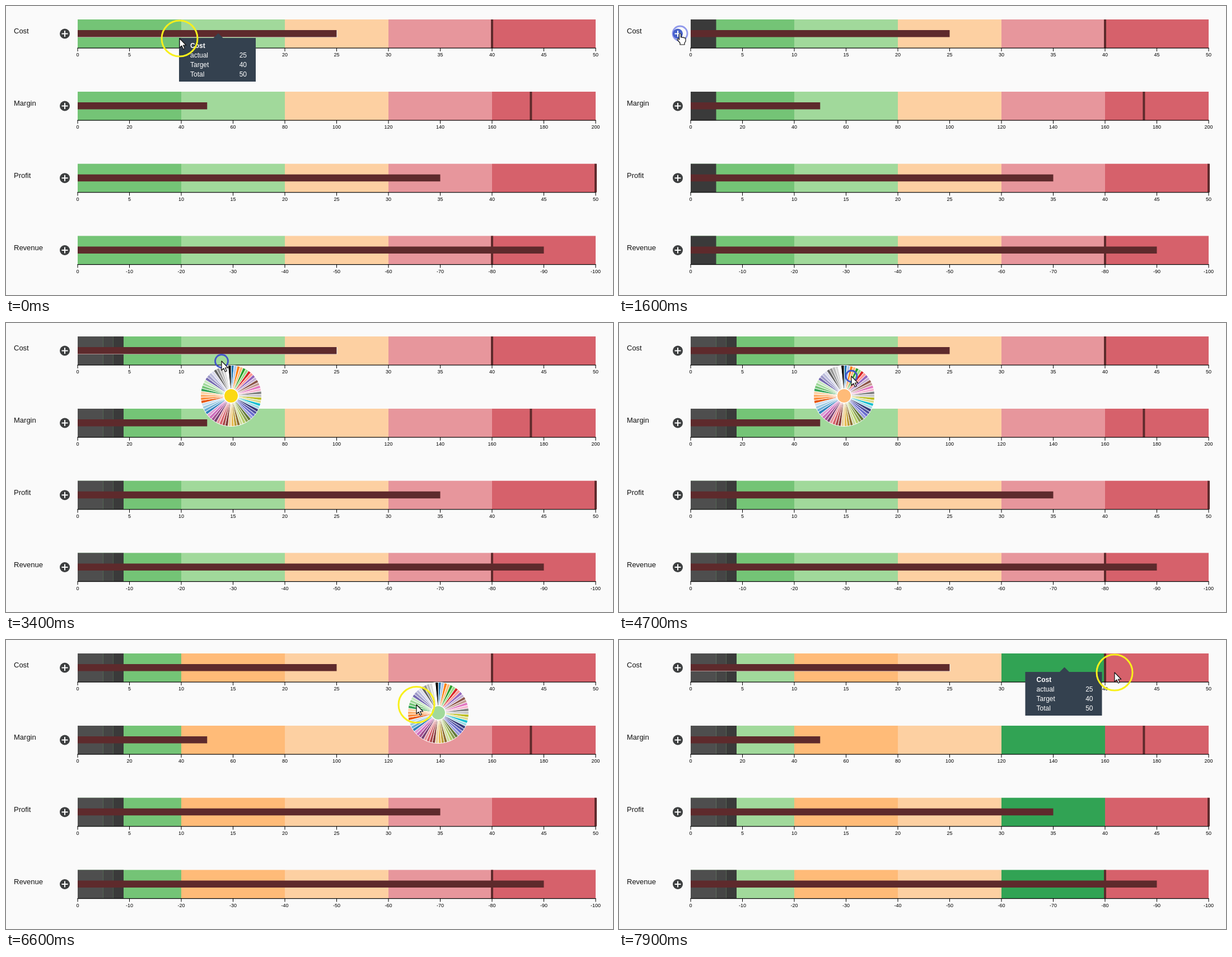
Animation of 1084x516 px, one loop 8000 ms. Source, as an HTML page with a canvas:

```html
<!DOCTYPE html>
<html lang="en">
<head>
<meta charset="utf-8">
<title>Bullet charts</title>
<style>
  html, body { margin: 0; width: 100%; height: 100%; overflow: hidden; background: #fafafa; }
  canvas { display: block; }
</style>
</head>
<body>
<canvas width="1084" height="516"></canvas>
<script>
const ctx = document.querySelector('canvas').getContext('2d');
const LOOP = 8000, LEFT = 128, WIDTH = 925, BAND = WIDTH / 5, TAU = Math.PI * 2;
const FONT = '"Liberation Sans", Arial, sans-serif';
const DARK_RED = '#5e2a2c';

const charts = [
  { name: 'Cost', y: 24, max: 50, step: 5, actual: 25, target: 40 },
  { name: 'Margin', y: 153, max: 200, step: 20, actual: 50, target: 175 },
  { name: 'Profit', y: 281.7, max: 50, step: 5, actual: 35, target: 50 },
  { name: 'Revenue', y: 410.5, max: -100, step: -10, actual: -90, target: -80 }
];

// The picker shows three 20-colour palettes followed by white and black.
const palette = (
  '1f77b4 aec7e8 ff7f0e ffbb78 2ca02c 98df8a d62728 ff9896 9467bd c5b0d5 ' +
  '8c564b c49c94 e377c2 f7b6d2 7f7f7f c7c7c7 bcbd22 dbdb8d 17becf 9edae5 ' +
  '393b79 5254a3 6b6ecf 9c9ede 637939 8ca252 b5cf6b cedb9c 8c6d31 bd9e39 ' +
  'e7ba52 e7cb94 843c39 ad494a d6616b e7969c 7b4173 a55194 ce6dbd de9ed6 ' +
  '3182bd 6baed6 9ecae1 c6dbef e6550d fd8d3c fdae6b fdd0a2 31a354 74c476 ' +
  'a1d99b c7e9c0 756bb1 9e9ac8 bcbddc dadaeb 636363 969696 bdbdbd d9d9d9 ' +
  'ffffff 000000').split(' ').map(hex => '#' + hex);
const SLICE = TAU / palette.length;

const PICK_ORANGE = 4800, PICK_GREEN = 7100;
const addClicks = [1500, 2050, 2500];
const addEdges = [173.5, 191.5, 210];
const greys = ['#3a3a3a', '#454545', '#4e4e4e'];
const wheels = [
  { from: 3400, to: PICK_ORANGE, x: 402 },
  { from: 5950, to: PICK_GREEN, x: 772 }
];
const tooltips = [
  { from: 0, to: 350, x: 379 },
  { from: 4950, to: 5600, x: 425 },
  { from: 7500, to: LOOP, x: 795.5 }
];
const barHover = [[0, 450], [3100, 3700], [4950, 5650], [7500, LOOP]];
const blueRing = [[1450, 4850], [5850, 6150], [7000, 7300]];

// time, x, y
const pointerPath = [
  [0, 310, 58], [100, 310, 58], [800, 109, 49], [2850, 109, 49],
  [3300, 385, 68], [3700, 385, 68], [4300, 415, 95], [4750, 415, 95],
  [4950, 425, 60], [5400, 669.5, 59], [5850, 755, 68], [6100, 755, 68],
  [6550, 733, 115.5], [6700, 733, 115.5], [6950, 732, 122], [7300, 732, 122],
  [7500, 795, 60], [7900, 885, 58], [LOOP, 885, 58]
];

const within = (t, ranges) => ranges.some(([from, to]) => t >= from && t < to);
const active = (t, items) => items.find(i => t >= i.from && t < i.to);

function pointerAt(t) {
  const i = pointerPath.findIndex(p => p[0] > t);
  const [t0, x0, y0] = pointerPath[i - 1], [t1, x1, y1] = pointerPath[i];
  const u = (t - t0) / (t1 - t0), e = u * u * (3 - 2 * u);
  return { x: x0 + (x1 - x0) * e, y: y0 + (y1 - y0) * e };
}

function rect(x, y, w, h, color) {
  ctx.fillStyle = color;
  ctx.fillRect(x, y, w, h);
}

function disc(x, y, r, color) {
  ctx.fillStyle = color;
  ctx.beginPath();
  ctx.arc(x, y, r, 0, TAU);
  ctx.fill();
}

function text(str, x, y, size, color, align = 'left', weight = '') {
  ctx.font = `${weight} ${size}px ${FONT}`;
  ctx.fillStyle = color;
  ctx.textAlign = align;
  ctx.fillText(str, x, y);
}

function bandColors(t) {
  return [
    t < PICK_GREEN ? '#74c476' : '#a1d99b',
    t < PICK_ORANGE ? '#a1d99b' : '#ffbb78',
    '#fdd0a2',
    t < PICK_GREEN ? '#e7969c' : '#31a354',
    '#d6616b'
  ];
}

function drawChart(chart, t, plusHover) {
  const { y, max } = chart;
  const scale = v => LEFT + WIDTH * v / max;

  bandColors(t).forEach((color, i) => rect(LEFT + i * BAND, y, BAND, 51, color));
  const added = addClicks.filter(click => t >= click).length;
  for (let i = 0; i < added; i++) {
    const start = i ? addEdges[i - 1] : LEFT;
    rect(start, y, addEdges[i] - start, 51, greys[added - 1 - i]);
  }

  const barWidth = scale(chart.actual) - LEFT;
  if (chart === charts[0] && within(t, barHover)) {
    rect(LEFT, y + 19, barWidth + 1, 13, '#fff');
  }
  rect(LEFT, y + 19, barWidth, 12.5, DARK_RED);
  rect(scale(chart.target) - 2, y, 4, 51, DARK_RED);

  rect(LEFT - .5, y + 50.5, WIDTH + 1, 1.2, '#000');
  for (let i = 0; i <= 10; i++) {
    const value = i * chart.step;
    rect(scale(value) - .5, y + 51, 1, 6, '#000');
    text(value, scale(value), y + 66, 9, '#000', 'center');
  }

  text(chart.name, 14, y + 25, 13, '#111');
  const cy = y + 25.5;
  disc(105, cy, 9, plusHover ? '#4661c8' : '#3d3f40');
  rect(99.5, cy - 1, 11, 2, '#fff');
  rect(104, cy - 5.5, 2, 11, '#fff');
}

function drawTooltip(x) {
  const left = x - 70;
  rect(left, 57, 137, 78, '#34414f');
  ctx.beginPath();
  ctx.moveTo(x - 9, 57.5);
  ctx.lineTo(x, 48.5);
  ctx.lineTo(x + 9, 57.5);
  ctx.fill();
  text('Cost', left + 20, 75, 12, '#fff', 'left', 'bold');
  [['actual', 25], ['Target', 40], ['Total', 50]].forEach(([label, value], i) => {
    const y = 92 + i * 17;
    text(label, left + 20, y, 12, '#fff');
    text(value, left + 121, y, 12, '#fff', 'right');
  });
}

function drawWheel(cx, pointer) {
  const cy = 130;
  ctx.lineWidth = 1;
  ctx.strokeStyle = '#fff';
  palette.forEach((color, i) => {
    const a = i * SLICE - TAU / 4;
    ctx.beginPath();
    ctx.moveTo(cx, cy);
    ctx.arc(cx, cy, 54.5, a, a + SLICE);
    ctx.closePath();
    ctx.fillStyle = color;
    ctx.fill();
    ctx.stroke();
  });
  const dx = pointer.x - cx, dy = pointer.y - cy;
  const angle = (Math.atan2(dx, -dy) + TAU) % TAU;
  const hovered = Math.hypot(dx, dy) < 54;
  disc(cx, cy, 13.5, '#fff');
  disc(cx, cy, 12, hovered ? palette[Math.floor(angle / SLICE)] : '#fbd914');
}

function drawRing({ x, y }, t) {
  const blue = within(t, blueRing);
  const sinceClick = Math.min(...addClicks.map(c => t >= c ? t - c : Infinity));
  const pulse = sinceClick < 250;
  ctx.beginPath();
  ctx.arc(x, y, blue ? (pulse ? 13 : t > 4500 ? 10 : 11.5) : 32, 0, TAU);
  ctx.lineWidth = blue ? 2.8 : 3;
  ctx.strokeStyle = blue ? (pulse ? 'rgba(75,90,225,.6)' : '#4355c9') : '#f8f01c';
  ctx.stroke();
}

const arrow = new Path2D('M0 0V16.5L3.8 13L6.5 19L9.2 17.8L6.5 12H11.7Z');
const hand = new Path2D('M-1.5 1Q0 -1 1.5 1V7Q3 5.5 4.3 7.4Q6 6 7.3 8.1' +
  'Q9.5 7 10 9.5V14L8 17V20H0V17L-5 11Q-5 8 -1.5 11Z');

function drawPointer({ x, y }, shape) {
  ctx.save();
  ctx.translate(x, y);
  ctx.lineWidth = 1.2;
  ctx.lineJoin = 'round';
  ctx.fillStyle = '#fff';
  ctx.strokeStyle = '#111';
  ctx.fill(shape);
  ctx.stroke(shape);
  ctx.restore();
}

function draw(now) {
  const t = now % LOOP;
  const pointer = pointerAt(t);
  const onPlus = Math.hypot(pointer.x - 105, pointer.y - 49.5) < 10;

  rect(0, 0, 1084, 516, '#fafafa');
  charts.forEach((chart, i) => drawChart(chart, t, onPlus && i === 0));
  const wheel = active(t, wheels), tooltip = active(t, tooltips);
  if (wheel) drawWheel(wheel.x, pointer);
  if (tooltip) drawTooltip(tooltip.x);
  drawRing(pointer, t);
  drawPointer(pointer, onPlus ? hand : arrow);
  requestAnimationFrame(draw);
}
requestAnimationFrame(draw);
</script>
</body>
</html>
```
